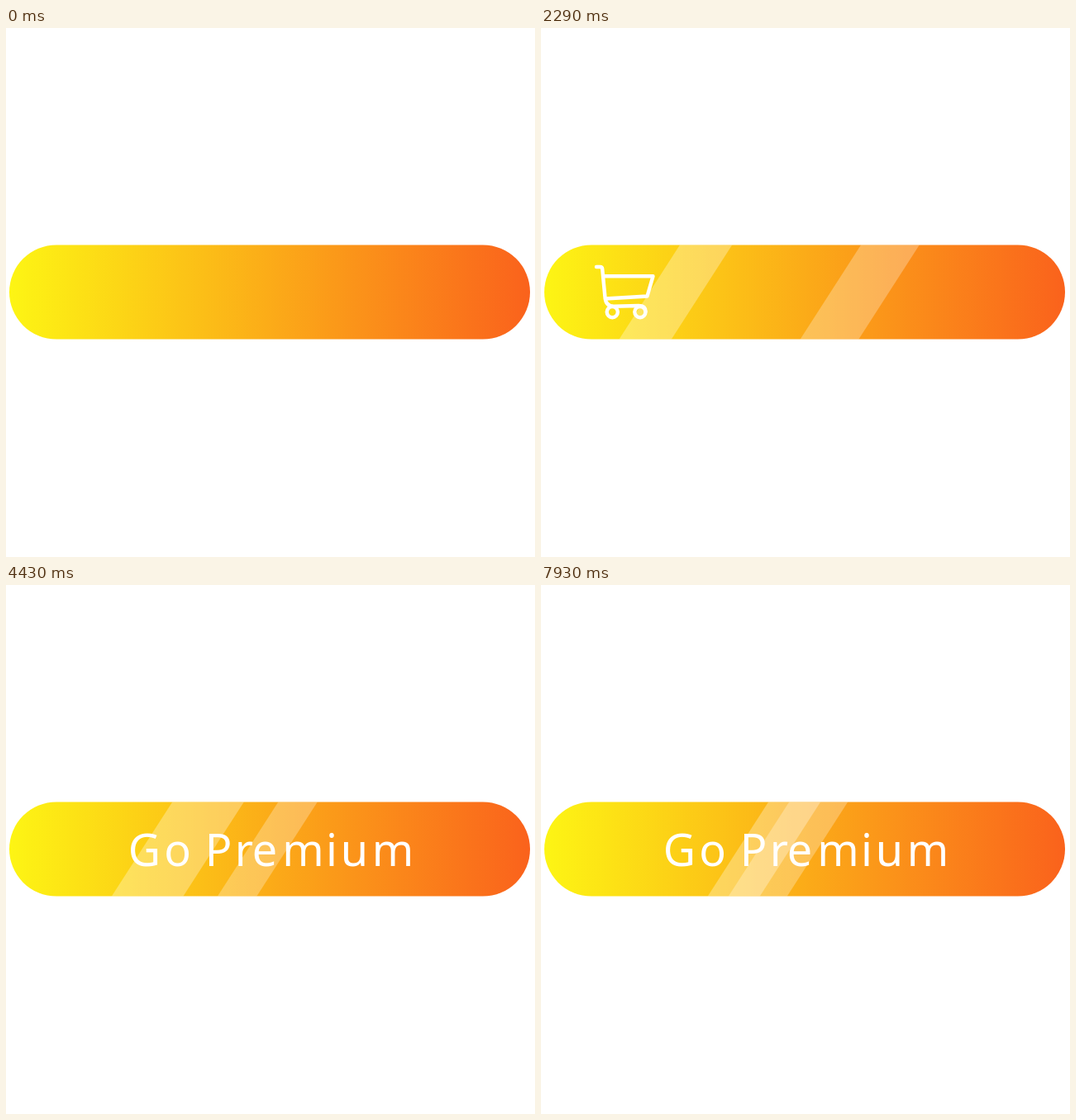
Animation of 640x640 px, one loop 8 s. Source, as an HTML page:

```html
<!DOCTYPE html>
<html lang="en">
<head>
<meta charset="utf-8">
<title>Go Premium</title>
<style>
  html, body { margin: 0; width: 100%; height: 100%; overflow: hidden; background: #fff; }
  svg { display: block; width: 100%; height: 100%; }
  #left, #right { fill: #fff; fill-opacity: .3; }
  #right { fill-opacity: .27; }
  #cart { fill: none; stroke: #fff; stroke-width: 4.4; stroke-linecap: round; stroke-linejoin: round; }
  text { font: 500 54px "Noto Sans", "Open Sans", sans-serif; fill: #fff; text-anchor: middle; }
</style>
</head>
<body>
<svg viewBox="0 0 640 640">
  <defs>
    <linearGradient id="warm">
      <stop offset="0" stop-color="#fdf514"/>
      <stop offset="1" stop-color="#fa621c"/>
    </linearGradient>
    <rect id="shape" x="4" y="262.4" width="630" height="114.2" rx="57.1"/>
    <clipPath id="pill"><use href="#shape"/></clipPath>
    <clipPath id="wipe"><rect id="wipeBox" y="262" height="115"/></clipPath>
  </defs>
  <use href="#shape" fill="url(#warm)"/>
  <g clip-path="url(#pill)">
    <path id="left"/>
    <path id="right"/>
    <g clip-path="url(#wipe)">
      <text y="339.5" x="167.5 207.5 232 257 288 313 359.5 394 421.5 468">Go Premium</text>
    </g>
    <rect id="dash" x="194" y="350" width="10.5" height="4.6" rx="2" fill="#fff"/>
    <g id="cart">
      <path d="M67 289H71.5Q74 289 74.2 291.5L77.5 326Q78.5 336.8 88 336.8L118 336Q126.5 336 126.5 343"/>
      <path d="M75.5 300.3H135.5L128.5 324.5L78 327.5"/>
      <circle cx="86.3" cy="343.6" r="6.6"/>
      <circle cx="119.9" cy="343.6" r="6.6"/>
    </g>
  </g>
</svg>
<script>
const LOOP = 8000, FPS = 14, TOP = 262, BOTTOM = 377, SLANT = 74;
const el = id => document.getElementById(id);

// Key poses: time, centre of the left band, centre of the right band.
const poses = [
  [430, -93, 777], [2290, 200.5, 422], [3000, 275, 350], [3710, 269, 334],
  [4780, 239, 360], [6710, 272, 343.5], [7930, 307, 336]
];

// Smooth curve through one column of the poses.
function centre(column, t) {
  const last = poses.length - 1;
  if (t <= poses[0][0]) return poses[0][column];
  if (t >= poses[last][0]) return poses[last][column];
  const i = poses.findIndex(p => p[0] > t) - 1;
  const slope = n => {
    const a = poses[Math.max(n - 1, 0)], b = poses[Math.min(n + 1, last)];
    return (b[column] - a[column]) / (b[0] - a[0]);
  };
  const from = poses[i], to = poses[i + 1];
  const h = to[0] - from[0], u = (t - from[0]) / h, v = 1 - u;
  return v * v * (1 + 2 * u) * from[column] + u * u * (3 - 2 * u) * to[column]
       + h * u * v * (v * slope(i) - u * slope(i + 1));
}

const progress = (t, from, to) => Math.min(1, Math.max(0, (t - from) / (to - from)));
const easeOut = p => 1 - (1 - p) ** 2;
const easeInOut = p => p < .5 ? 2 * p * p : 1 - 2 * (1 - p) ** 2;

function drawBand(id, middle, width) {
  const a = middle - width / 2, b = middle + width / 2;
  el(id).setAttribute("d", `M${a} ${TOP}H${b}L${b - SLANT} ${BOTTOM}H${a - SLANT}Z`);
}

function draw(t) {
  // The left band widens and narrows; the right one takes up the rest.
  const width = Math.max(63, 88 - 25 * ((t - 5100) / 2830) ** 2);
  drawBand("left", centre(1, t), width);
  drawBand("right", centre(2, t), 134 - width);

  const enter = easeOut(progress(t, 350, 1430));
  const leave = easeInOut(progress(t, 2649, 4099));
  const shift = -142 * (1 - enter) + 575 * leave;
  el("cart").setAttribute("transform", `translate(${shift} 0)`);
  el("wipeBox").setAttribute("width", Math.max(0, 67 + shift));
  el("dash").style.display = t >= 3570 && t < 3920 ? "" : "none";
}

const start = performance.now();
function tick() {
  const t = (performance.now() - start) % LOOP;
  draw(Math.floor(t * FPS / 1000 + .1) * 1000 / FPS);
  requestAnimationFrame(tick);
}
tick();
</script>
</body>
</html>
```
